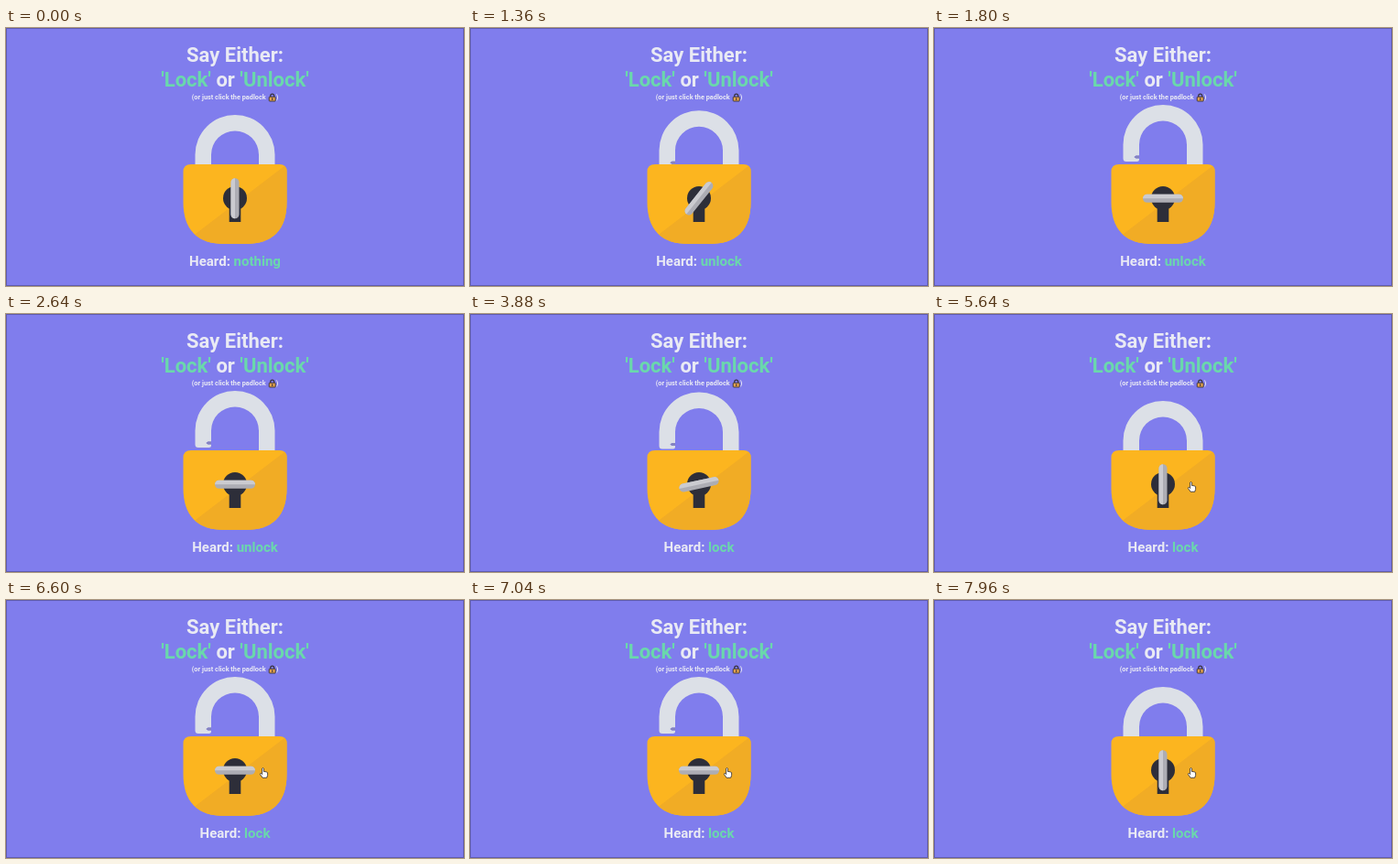
Write an HTML page that moves like this. It is 500 by 282 pixels and loops after 8000 ms.

```html
<!DOCTYPE html>
<html lang="en">
<head>
<meta charset="utf-8">
<title>Voice padlock</title>
<style>
  html, body { margin: 0; width: 100%; height: 100%; overflow: hidden; background: #807ded; }
  svg { display: block; width: 100vw; height: 100vh; }
  text { font-family: Roboto, sans-serif; font-weight: 700; fill: #e9eaf4; }
  .mid { text-anchor: middle; }
  .word { fill: #6ad8ac; }
</style>
</head>
<body>
<svg viewBox="0 0 500 282">
  <defs>
    <clipPath id="bodyClip">
      <path id="bodyShape" d="M202 149H298.500Q306.500 149 306.500 157V190Q306.500 236 261 236H239Q193.500 236 193.500 190V157Q193.500 149 202 149Z"/>
    </clipPath>
  </defs>
  <rect width="500" height="282" fill="#807ded"/>
  <rect x=".5" y=".5" width="499" height="281" fill="none" stroke="#5f5cae"/>

  <text class="mid" x="250" y="36.500" font-size="22">Say Either:</text>
  <text class="mid" x="250" y="63.500" font-size="22"><tspan class="word">'Lock'</tspan> or <tspan class="word">'Unlock'</tspan></text>
  <text x="202.800" y="78.300" font-size="7.330">(or just click the padlock</text>
  <text x="294.800" y="78.300" font-size="7.330">)</text>

  <!-- inline padlock icon -->
  <path d="M288.700 75.500V74.200a2 2 0 0 1 4 0V75.500" fill="none" stroke="#35313c" stroke-width="1.200"/>
  <rect x="287.200" y="75.200" width="7" height="4.800" rx=".7" fill="#e3a04a" stroke="#35313c" stroke-width=".9"/>
  <path d="M290.700 76.500V78.700" stroke="#35313c" stroke-width="1.200"/>

  <g id="shackle">
    <path d="M206.500 138.500A43.500 43.500 0 0 1 293.500 138.500V172H276V138.500A26 26 0 0 0 224 138.500V150.500H220.500L218.500 152L220.500 153.500H224V154.500Q224 157 221.500 157H210Q206.500 157 206.500 153.500Z" fill="#dce0e7"/>
    <path d="M224 150.500H220.500L218.500 152L220.500 153.500H224Z" fill="#8583c0"/>
  </g>

  <use href="#bodyShape" fill="#fcb51f"/>
  <path d="M203 228L307 148.500V240H203Z" fill="#f1ac25" clip-path="url(#bodyClip)"/>

  <g fill="#2d2e39">
    <circle cx="250" cy="186" r="13"/>
    <rect x="243.700" y="190" width="12.600" height="22"/>
  </g>

  <g id="key">
    <rect x="-4.500" y="-22" width="9" height="44" rx="4.500" fill="#adadb4"/>
    <path d="M0 -22V22A4.500 4.500 0 0 1 -4.500 17.500V-17.500A4.500 4.500 0 0 1 0 -22Z" fill="#cbcbd0"/>
  </g>

  <text class="mid" x="250" y="259.500" font-size="15">Heard: <tspan class="word" id="heard">nothing</tspan></text>

  <g id="cursor" fill="#fff" stroke="#2b2930" stroke-width=".8" stroke-linejoin="round">
    <path id="arrow" d="M0 0V10L2.300 7.900L3.900 11.300L5.400 10.600L3.900 7.300H7Z"/>
    <path id="hand" d="M-.9 .6Q0 -.6 .9 .6V4L2.500 4.100L3.900 4.500L5.100 5.200V8L4.200 10.800H-.4L-3 7.200Q-3.200 5.700 -2 6L-.9 7Z"/>
  </g>
</svg>
<script>
  const LOOP = 8000;
  const TURN = 420;
  const LIFT = 11;
  const UNLOCKS = [1170, 5700];
  const LOCKS = [3780, 7200];
  const ENTER = 4700, ARRIVE = 5300;
  const FROM = [500, 226], TO = [280.500, 183.500];

  const $ = id => document.getElementById(id);
  const [shackle, key, heard, cursor, arrow, hand] =
    ['shackle', 'key', 'heard', 'cursor', 'arrow', 'hand'].map($);

  const progress = (t, start, length) => Math.min(1, Math.max(0, (t - start) / length));
  const smooth = p => (1 - Math.cos(Math.PI * p)) / 2;
  const mix = (a, b, p) => a + (b - a) * p;
  const show = (el, on) => el.setAttribute('visibility', on ? 'visible' : 'hidden');

  function openness(t) {
    const total = starts => starts.reduce((sum, s) => sum + smooth(progress(t, s, TURN)), 0);
    return total(UNLOCKS) - total(LOCKS);
  }

  function heardWord(t) {
    if (t < UNLOCKS[0]) return 'nothing';
    return t < LOCKS[0] ? 'unlock' : 'lock';
  }

  function drawCursor(t) {
    const p = smooth(progress(t, ENTER, ARRIVE - ENTER));
    const [x, y] = FROM.map((v, i) => mix(v, TO[i], p));
    const visible = t >= ENTER;
    const overLock = x < 306;
    cursor.setAttribute('transform', `translate(${x} ${y})`);
    show(arrow, visible && !overLock);
    show(hand, visible && overLock);
  }

  function draw(t) {
    const open = openness(t);
    const word = heardWord(t);
    shackle.setAttribute('transform', `translate(0 ${-LIFT * open})`);
    key.setAttribute('transform', `translate(250 186.300) rotate(${90 * open})`);
    if (heard.textContent !== word) heard.textContent = word;
    drawCursor(t);
  }

  const begin = performance.now();
  function tick() {
    draw((performance.now() - begin) % LOOP);
    requestAnimationFrame(tick);
  }
  draw(0);
  requestAnimationFrame(tick);
</script>
</body>
</html>
```
